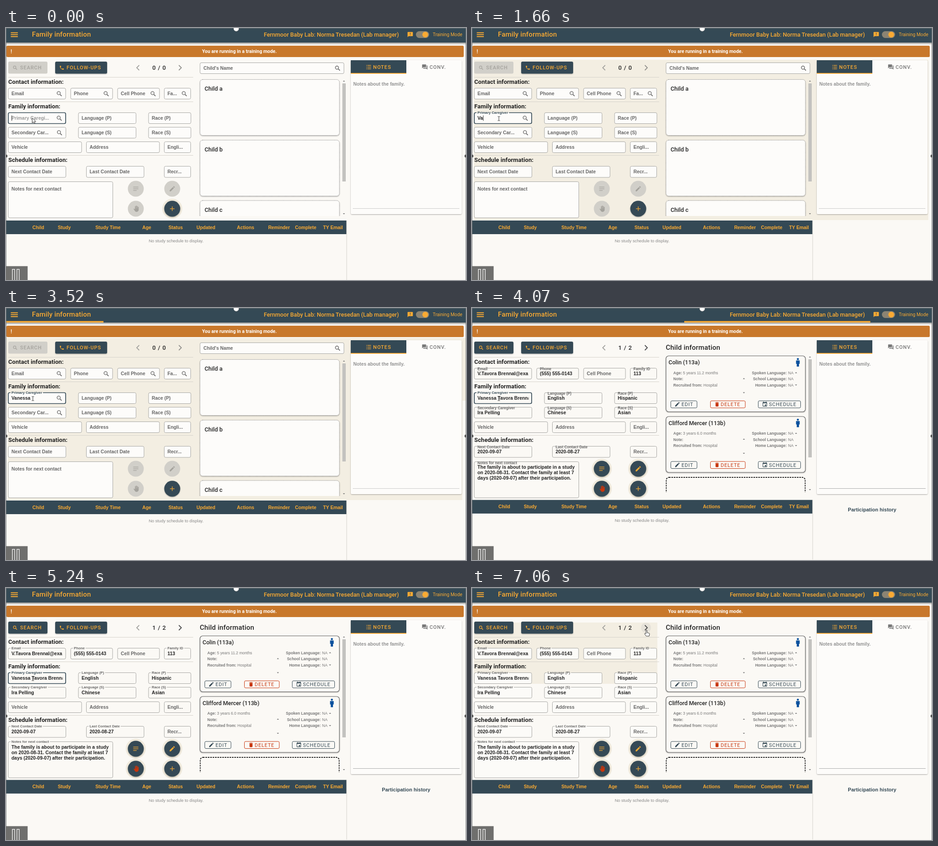
Recreate the animation shown at these times as an HTML page. Size 1010 px wide and 555 px high, loop 8000 ms.

```html
<!DOCTYPE html>
<html lang="en">
<head>
<meta charset="utf-8">
<title>Family information</title>
<style>
html, body { margin: 0; width: 100%; height: 100%; overflow: hidden; background: #fbf9f5; }
svg { display: block; width: 1010px; height: 555px; }
text { font-family: "Liberation Sans", Arial, sans-serif; white-space: pre; }
text.r { font-family: Roboto, "Open Sans", sans-serif; }
</style>
</head>
<body>
<svg id="stage" viewBox="0 0 1010 555" xmlns="http://www.w3.org/2000/svg"></svg>
<script>
const LOOP = 8000, LOADED = 3910;
const DARK = '#344955', GOLD = '#f9aa33', RED = '#c8350c', LIGHT = '#fbf9f5', BEIGE = '#f3eee2';
const PAPER = '#fdfcfa', OFF = '#d1cfc9', OFFTEXT = '#a5a39d', INK = '#222', LINE = '#a6a6a3';

// The screen only repaints at these moments.
const CUTS = [0, 130, 270, 410, 550, 950, 1070, 1660, 1960, 2390, 2700, 2820, 2940, 3370, 3520, 3770,
  3910, 4050, 4190, 4340, 4490, 4640, 5390, 5540, 5820, 6100, 6640, 7060];
const NAME = 'Vanessa', KEYS = [950, 1660, 1960, 2390, 2700, 2820, 2940];

const el = (tag, attrs, body = '') =>
  `<${tag} ${Object.entries(attrs).map(([k, v]) => `${k}="${v}"`).join(' ')}>${body}</${tag}>`;
const rect = (x, y, width, height, fill, more = {}) => el('rect', { x, y, width, height, fill, ...more });
const circle = (cx, cy, r, fill, more = {}) => el('circle', { cx, cy, r, fill, ...more });
const path = (d, more = {}) => el('path', { d, fill: 'none', ...more });
const line = (d, stroke, width = 1, more = {}) => path(d, { stroke, 'stroke-width': width, ...more });
const group = (id, body) => el('g', { id }, body);
const arial = (x, y, s, size, fill, weight = 700, more = {}) =>
  el('text', { x, y, 'font-size': size, fill, 'font-weight': weight, ...more }, s);
const roboto = (x, y, s, size, fill, weight = 500, spacing = 0, more = {}) =>
  arial(x, y, s, size, fill, weight, { class: 'r', 'letter-spacing': spacing, ...more });
const MIDDLE = { 'text-anchor': 'middle' };

const ICONS = {
  pencil: 'M3 17.2V21h3.8L17.8 9.9 14 6.2zM20.7 7a1 1 0 0 0 0-1.4l-2.3-2.3a1 1 0 0 0-1.4 0l-1.8 1.8 3.7 3.7z',
  hand: 'M22 6v10a7 7 0 0 1-7 7c-3 0-5-1-6.500-3.500L4 12.500c1-1.200 2.200-1 3.200 0L9 14.500V4.200a1.200 1.200 0 0 1 2.500 0V11h.7V2.200a1.200 1.200 0 0 1 2.500 0V11h.7V3.200a1.200 1.200 0 0 1 2.500 0V11h.7V6a1.200 1.200 0 0 1 2.400 0z',
  phone: 'M6.6 10.8c1.4 2.8 3.8 5.1 6.6 6.6l2.2-2.2c.3-.3.7-.4 1-.2 1.1.4 2.300.6 3.600.6.6 0 1 .4 1 1V20c0 .6-.4 1-1 1C10.600 21 3 13.400 3 4c0-.6.4-1 1-1h3.500c.6 0 1 .4 1 1 0 1.300.2 2.500.6 3.600.1.3 0 .7-.2 1z',
  trash: 'M6 19a2 2 0 0 0 2 2h8a2 2 0 0 0 2-2V7H6zM19 4h-3.500l-1-1h-5l-1 1H5v2h14z',
  calendar: 'M19 3h-1V1h-2v2H8V1H6v2H5a2 2 0 0 0-2 2v14a2 2 0 0 0 2 2h14a2 2 0 0 0 2-2V5a2 2 0 0 0-2-2zm0 16H5V8h14zM12 13h5v5h-5z',
  alert: 'M20 2H4a2 2 0 0 0-2 2v18l4-4h14a2 2 0 0 0 2-2V4a2 2 0 0 0-2-2zm-9 3h2v6h-2zm0 8h2v2h-2z',
  forum: 'M21 6h-2v9H6v2c0 .6.4 1 1 1h11l4 4V7c0-.6-.4-1-1-1zm-4 6V3c0-.6-.4-1-1-1H3c-.6 0-1 .4-1 1v14l4-4h10c.6 0 1-.4 1-1z',
  list: 'M7 4h14v2.400H7zM7 11h14v2.400H7zM7 18h14v2.400H7zM2 4h3v2.400H2zM2 11h3v2.400H2zM2 18h3v2.400H2z',
  lines: 'M3 5h18v2H3zM3 11h18v2H3zM3 17h12v2H3z',
  plus: 'M11 4h2v7h7v2h-7v7h-2v-7H4v-2h7z',
};
const icon = (name, x, y, size, fill) => path(ICONS[name], {
  fill, 'fill-rule': 'evenodd', transform: `translate(${x - size / 2} ${y - size / 2}) scale(${size / 24})` });
const lens = (x, y, color, k = 1) =>
  line(`M${x + 1.6 * k} ${y + 1.6 * k}l${3.6 * k} ${3.6 * k}`, color, 1.7 * k) +
  circle(x - 1.3 * k, y - 1.3 * k, 3.5 * k, 'none', { stroke: color, 'stroke-width': 1.4 * k });
const chevron = (x, dir, color) => line(`M${x - 2.5 * dir} 82l${5.5 * dir} 5.500l${-5.5 * dir} 5.500`, color, 1.8);
const SHADE = { filter: 'url(#shade)' };

// label, short label, loaded value, x, y, width, height, has a lens
const FIELDS = [
  ['Email', 0, 'V.Tavora Brennal@exa', 5, 132.5, 126, 24, 1],
  ['Phone', 0, '(555) 555-0143', 142, 132.5, 92, 24, 1],
  ['Cell Phone', 0, '', 245, 132.5, 92, 24, 1],
  ['Family ID', 'Fa...', '113', 347.5, 132.5, 58, 24, 1],
  ['Primary Caregiver', 'Primary Caregi...', 'Vanessa Tavora Brennal', 5, 186.5, 126, 24, 1],
  ['Language (P)', 0, 'English', 159, 186.5, 126.5, 24],
  ['Race (P)', 0, 'Hispanic', 313, 186.5, 93, 24],
  ['Secondary Caregiver', 'Secondary Car...', 'Ira Pelling', 5, 218.5, 126.5, 24, 1],
  ['Language (S)', 0, 'Chinese', 159, 218.5, 126.5, 24],
  ['Race (S)', 0, 'Asian', 313, 218.5, 93, 24],
  ['Vehicle', 0, '', 5, 250.5, 161, 24],
  ['Address', 0, '', 176.5, 250.5, 160.5, 24],
  ['English', 'Engli...', '', 347.5, 250.5, 58, 24],
  ['Next Contact Date', 0, '2020-09-07', 5, 304.5, 126.5, 24.5],
  ['Last Contact Date', 0, '2020-08-27', 176.5, 304.5, 126.5, 24.5],
  ['Recruitment', 'Recr...', '', 347.5, 304.5, 58, 24.5],
  ['Notes for next contact', 0, 'The family is about to participate in a study\non 2020-08-31. Contact the family at least 7\ndays (2020-09-07) after their participation.', 5, 338.5, 229.5, 79.5],
].map(([label, short, value, x, y, w, h, find], i) => ({ label, short: short || label, value, x, y, w, h, find, i,
  main: i === 4, base: y + Math.min(h, 33) / 2 + 3.4 }));

const fieldMarkup = f =>
  el('clipPath', { id: 'clip' + f.i }, rect(f.x, f.y, f.w - 6.5, f.h, '#000')) +
  path('', { id: 'box' + f.i }) +
  group('find' + f.i, f.find ? lens(f.x + f.w - 14, f.base - 3.2, '#666') : '') +
  el('g', { id: 'val' + f.i, 'clip-path': `url(#clip${f.i})` },
    f.value.split('\n').map((s, k) => arial(f.x + 7, f.base + k * 12.3 - (f.h > 40 ? 4.7 : 0), s, 10.4, INK)).join('')) +
  el('text', { id: 'lab' + f.i, 'font-size': 10.4, 'font-weight': 700, fill: '#666' }, f.label);

const pill = (x, w, s, tx, color, bg) =>
  rect(x, 74, w, 26.5, bg, { rx: 3, ...(bg === DARK ? SHADE : {}) }) + roboto(tx, 91, s, 11, color, 500, .95);
const outlineBtn = (x, y, w, s, tx, name, color, edge) =>
  rect(x + .5, y + .5, w, 15.5, 'none', { rx: 2.5, stroke: edge }) +
  icon(name, x + 15, y + 8, 13, color) + roboto(tx, y + 12.2, s, 10.8, edge, 400, .9);
const arrow = (x, y, dir) => path(`M${x - 2.3} ${y + dir}h4.600l-2.300 ${-2.5 * dir}z`, { fill: '#777' });

const blankCard = (y, s) =>
  rect(426, y, 306, 123, PAPER, { rx: 6, stroke: '#999', 'stroke-dasharray': '2 1.200', ...SHADE }) +
  roboto(436, y + 24.5, s, 12.8, INK);

function childCard(y, name, age) {
  const small = (x, dy, s, weight = 400, more) => arial(x, y + dy, s, 8.55, '#777', weight, more);
  const pair = (dy, k, v) => small(442, dy, `<tspan font-weight="700">${k}:</tspan> ${v}`);
  const lang = (dy, k) => small(691, dy, k + ' Language:', 700, { 'text-anchor': 'end' }) + small(694, dy, 'NA');
  return rect(426, y, 306, 123, LIGHT, { rx: 6, stroke: '#666', 'stroke-width': 1.2, ...SHADE }) +
    roboto(431.5, y + 18.5, name, 12.5, INK) +
    circle(715.5, y + 7, 2.3, '#0c529e') +
    path(`M711.500 ${y + 10}h8v7.500h-1.500v6h-5v-6h-1.500z`, { fill: '#0c529e' }) +
    pair(40, 'Age', age) + pair(53.5, 'Note', '') + pair(67.2, 'Recruited from', 'Hospital') +
    lang(40, 'Spoken') + lang(53.5, 'School') + lang(67.2, 'Home') +
    arrow(597, y + 50, 1) + arrow(597, y + 81, -1) + arrow(711.5, y + 37, 1) + arrow(711.5, y + 64, -1) +
    outlineBtn(436, y + 98.5, 57.5, 'EDIT', 460, 'pencil', DARK, DARK) +
    outlineBtn(523, y + 98.5, 76.5, 'DELETE', 546, 'trash', RED, RED) +
    outlineBtn(628, y + 98.5, 93, 'SCHEDULE', 652, 'calendar', DARK, DARK);
}

const scrollbar = y => rect(738.5, y + 9, 7.5, 216, '#c3c2bf') + arrow(742, y + 4, 1) + arrow(742, y + 296, -1);

const FABS = [['lines', 285, 354], ['pencil', 365, 354], ['hand', 285, 398], ['plus', 365, 398]];
const fab = ([name, x, y], on) =>
  circle(x, y, 17.5, on ? DARK : OFF, on ? SHADE : {}) +
  icon(name, x, y, 15, on ? (name === 'hand' ? RED : GOLD) : OFFTEXT);
const halo = ([, x, y]) => circle(x, y, 22, '#f0eadc');

const base =
  rect(0, 32, 1010, 5, 'url(#fade)') +
  rect(0, 0, 1010, 32, DARK) +
  [10.5, 14.7, 19].map(y => rect(10.5, y - 1, 15.5, 2, GOLD)).join('') +
  roboto(57, 19.2, 'Family information', 15, GOLD, 500, .19) +
  roboto(566, 19, 'Fernmoor Baby Lab: Norma Tresedan (Lab manager)', 12.65, GOLD) +
  icon('alert', 887.5, 14.5, 14, GOLD) +
  rect(900, 7, 29, 15, '#8b8473', { rx: 7.5 }) + circle(920.5, 14.5, 6.3, GOLD) +
  roboto(937, 18, 'Training Mode', 10.2, GOLD, 400) +
  rect(1, 39, 1004, 25, '#c8782b', { rx: 2.5 }) +
  roboto(10, 56, '!', 12, '#fff', 500) +
  roboto(512.5, 55, 'You are running in a training mode.', 10.45, '#fff', 700, 0, MIDDLE) +
  pill(108, 114, 'FOLLOW-UPS', 133, GOLD, DARK) + icon('phone', 122.5, 87.5, 11.5, GOLD) +
  chevron(290, -1, '#a3a29e') +
  [108.5, 162.5, 280.5].map(y => line(`M5 ${y}H411`, '#d6d3cc')).join('') +
  [['Contact', 122.8], ['Family', 176.8], ['Schedule', 294.5]]
    .map(([s, y]) => roboto(5, y, s + ' information:', 13, INK, 700, .03)).join('') +
  rect(757, 71, 243.5, 339, PAPER, { rx: 3, ...SHADE }) +
  rect(757, 71, 122, 29, DARK) + rect(757, 99, 122, 1.8, GOLD) +
  icon('list', 796.5, 86, 13, GOLD) + roboto(806, 90, 'NOTES', 11.2, GOLD, 500, .95) +
  icon('forum', 919.5, 86, 14, '#777') + roboto(930, 90, 'CONV.', 11, '#777', 500, .9) +
  arial(762.5, 126.5, 'Notes about the family.', 10.3, '#929292');

const heads = [['Child', 71], ['Study', 128], ['Study Time', 224], ['Age', 309], ['Status', 372.5], ['Updated', 439],
  ['Actions', 526], ['Reminder', 599.5], ['Complete', 658], ['TY Email', 718]];
const table = rect(0, 424, 747.5, 30, DARK) +
  heads.map(([s, x]) => arial(x, 442.5, s, 10.35, GOLD, 700, MIDDLE)).join('') +
  line('M748 424V555', '#d2d0ca') +
  arial(373.5, 472, 'No study schedule to display.', 9.3, '#888', 400, MIDDLE);

const empty =
  pill(5, 86, 'SEARCH', 31, OFFTEXT, OFF) + lens(20, 87.5, OFFTEXT, .8) +
  roboto(336.5, 92, '0 / 0', 13, INK, 500, .8, MIDDLE) + chevron(382, 1, '#92918d') +
  rect(426, 76.5, 316, 24, PAPER, { rx: 3, stroke: LINE }) +
  arial(433.5, 92, "Child's Name", 10.3, '#666') + lens(728, 88.5, '#666') +
  el('g', { 'clip-path': 'url(#blankArea)' }, blankCard(113.5, 'Child a') + blankCard(247, 'Child b') + blankCard(380, 'Child c')) +
  scrollbar(113) +
  line('M762 397.500H996', '#999', 1, { 'stroke-dasharray': '1 1' }) +
  group('plusHalo', halo(FABS[3])) + FABS.map((f, i) => fab(f, i === 3)).join('');

const loaded =
  pill(5, 86, 'SEARCH', 31, GOLD, DARK) + lens(20, 87.5, GOLD, .8) +
  roboto(336.5, 92, '1 / 2', 13, INK, 500, .8, MIDDLE) +
  group('hover', circle(382, 87.5, 11, '#e6e2d9')) + chevron(382, 1, '#4a4a4a') +
  roboto(425.5, 91.5, 'Child information', 15, INK, 500, .19) +
  childCard(105.5, 'Colin (113a)', '5 years 11.2 months') +
  childCard(239, 'Clifford Mercer (113b)', '3 years 6.0 months') +
  el('g', { 'clip-path': 'url(#cardArea)' },
    rect(426.5, 373, 305, 123, LIGHT, { rx: 6, stroke: '#222', 'stroke-width': 1.8, 'stroke-dasharray': '3.500 1.800' })) +
  scrollbar(104) + line('M762 397.500H996', '#aaa') +
  FABS.map(f => halo(f) + fab(f, true)).join('') +
  arial(878.5, 448.3, 'Participation history', 11, DARK, 700, MIDDLE);

// Beige areas: from, to, x1, y1, x2, y2
const TINTS = [[130, LOADED, 4, 70, 1002, 423], [3370, LOADED, 0, 66, 1010, 204],
  [5390, LOOP, 142, 157, 204, 205], [5540, LOOP, 142, 102, 311, 157], [5820, LOOP, 224, 82, 407, 157],
  [6100, LOOP, 348, 76, 407, 148], [6640, LOOP, 4, 76, 407, 211]];

const outline = { stroke: '#222', 'stroke-width': .9, 'stroke-linejoin': 'round', fill: '#fff' };
const cursors =
  group('arrowCur', path('M0 0V11L2.600 8.700 4.500 12.500 6.400 11.600 4.600 8H8z', outline)) +
  group('beamCur', line('M-2.500 -4.500H-.6L0 -4 .6 -4.500H2.500M0 -4V4M-2.500 4.500H-.6L0 4 .6 4.500H2.500', '#333', 1)) +
  group('handCur', path('M-2 -5.500a1.200 1.200 0 0 1 2.400 0V-1l4 .8a1.800 1.800 0 0 1 1.500 2L5 6.500H-1.500L-5 1.800a1.100 1.100 0 0 1 1.600-1.400L-2 1.500z', outline));

const stage = document.getElementById('stage');
stage.innerHTML = el('defs', {},
  '<filter id="shade" x="-20%" y="-20%" width="140%" height="150%"><feDropShadow dx="0" dy="1" stdDeviation="1.200" flood-opacity=".35"/></filter>' +
  '<linearGradient id="fade" x2="0" y2="1"><stop stop-color="#9a9a97"/><stop offset="1" stop-color="#9a9a97" stop-opacity="0"/></linearGradient>' +
  el('clipPath', { id: 'blankArea' }, rect(420, 108, 320, 306, '#000')) +
  el('clipPath', { id: 'cardArea' }, rect(420, 360, 320, 46, '#000'))) +
  rect(0, 0, 1010, 555, LIGHT) +
  TINTS.map(([, , x, y, x2, y2], i) => rect(x, y, x2 - x, y2 - y, BEIGE, { id: 'tint' + i })).join('') +
  base + group('table', table) + group('empty', empty) + group('loaded', loaded) +
  rect(0, 28.7, 0, 3.3, GOLD, { id: 'bar' }) +
  FIELDS.map(fieldMarkup).join('') +
  arial(12, FIELDS[4].base, '', 10.4, INK, 700, { id: 'typed' }) +
  rect(0, 192.5, 1, 12, '#333', { id: 'caret' }) + cursors +
  line('M0 .5H1010M.5 0V555M1009.500 0V555', '#77797a', .8) +
  circle(505.5, 1.5, 5.8, '#fff', { stroke: '#777', 'stroke-width': .8 }) +
  circle(0, 282, 3.2, '#555') + circle(1010, 282, 3.2, '#555') +
  rect(0, 524.5, 47.5, 31, '#6f6f6d') +
  [14, 24].map(x => rect(x, 531.5, 5, 26, 'none', { stroke: '#fff', 'stroke-width': 1.3 })).join('');

const $ = id => document.getElementById(id);
const show = (id, on) => $(id).setAttribute('display', on ? 'inline' : 'none');
const put = (id, attrs) => { for (const k in attrs) $(id).setAttribute(k, attrs[k]); };

// Standard CSS "ease" curve
function ease(p) {
  if (p <= 0) return 0;
  if (p >= 1) return 1;
  const curve = (a, b, u) => 3 * a * u * (1 - u) ** 2 + 3 * b * u * u * (1 - u) + u ** 3;
  let lo = 0, hi = 1;
  for (let i = 0; i < 24; i++) {
    const mid = (lo + hi) / 2;
    if (curve(.25, .25, mid) < p) lo = mid; else hi = mid;
  }
  return curve(.1, 1, lo);
}

// Rounded box whose top edge is open between a and b
function boxPath({ x, y, w, h }, a, b) {
  const r = 3, c = (dx, dy, ex, ey) => `q${dx} ${dy} ${ex} ${ey}`;
  return `M${b} ${y}H${x + w - r}${c(r, 0, r, r)}V${y + h - r}${c(0, r, -r, r)}H${x + r}${c(-r, 0, -r, -r)}V${y + r}${c(0, -r, r, -r)}H${a}`;
}

function drawField(f, t, full) {
  const filled = full && f.value;
  const up = f.main ? ease(t / 300) : filled ? ease((t - 3850) / 380) : 0;
  const open = f.main ? t >= 130 : filled && t >= 4340;
  const focus = f.main && t < 6640;
  const label = $('lab' + f.i), k = 1 - .25 * up;
  label.textContent = up > 0 ? f.label : f.short;
  const from = f.x + 5, to = open ? f.x + 9 + label.getComputedTextLength() * .75 : from;
  put('lab' + f.i, {
    transform: `translate(${f.x + 7} ${f.base + (f.y + 2.6 - f.base) * up}) scale(${k})`,
    fill: f.main && t < 130 ? '#999' : focus ? DARK : '#666' });
  put('box' + f.i, { d: boxPath(f, from, to), fill: full ? (t >= 5390 ? '#fcfbf8' : LIGHT) : PAPER,
    stroke: focus ? DARK : LINE, 'stroke-width': focus ? 1.7 : 1 });
  show('find' + f.i, !full);
  show('val' + f.i, filled);
}

function drawCursor(t) {
  const at = t < 130 ? ['arrowCur', 57.5, 198] : t < 5390 ? ['beamCur', 59, 199.5] : t < 5540 ? ['beamCur', 150, 149]
    : t < 5820 ? ['beamCur', 228, 149] : t < 6100 ? ['beamCur', 352, 141] : ['handCur', 384, 99.5];
  for (const id of ['arrowCur', 'beamCur', 'handCur']) show(id, id === at[0]);
  put(at[0], { transform: `translate(${at[1]} ${at[2]})` });
}

function draw(now) {
  const t = CUTS.filter(c => c <= now).pop();
  const full = t >= LOADED;
  TINTS.forEach(([a, b], i) => show('tint' + i, t >= a && t < b));
  show('empty', !full);
  show('loaded', full);
  show('plusHalo', t < 130);
  show('hover', t >= 6100);
  put('table', { transform: `translate(0 ${full ? -1.3 : 0})` });
  FIELDS.forEach(f => drawField(f, t, full));

  $('typed').textContent = full ? '' : NAME.slice(0, KEYS.filter(k => k <= t).length);
  show('caret', t < 3370);
  put('caret', { x: 12.2 + $('typed').getComputedTextLength() });

  const e = ease((t - 3281) / 1540);
  const left = Math.max(0, (-2 + 3.07 * e) * 1010), right = Math.min(1010, 1.08 * e * 1010);
  show('bar', t >= 3370 && t < 4640);
  put('bar', { x: left, width: Math.max(0, right - left) });
  drawCursor(t);
}

const start = performance.now();
function tick() {
  draw((performance.now() - start) % LOOP);
  requestAnimationFrame(tick);
}
tick();
</script>
</body>
</html>
```
